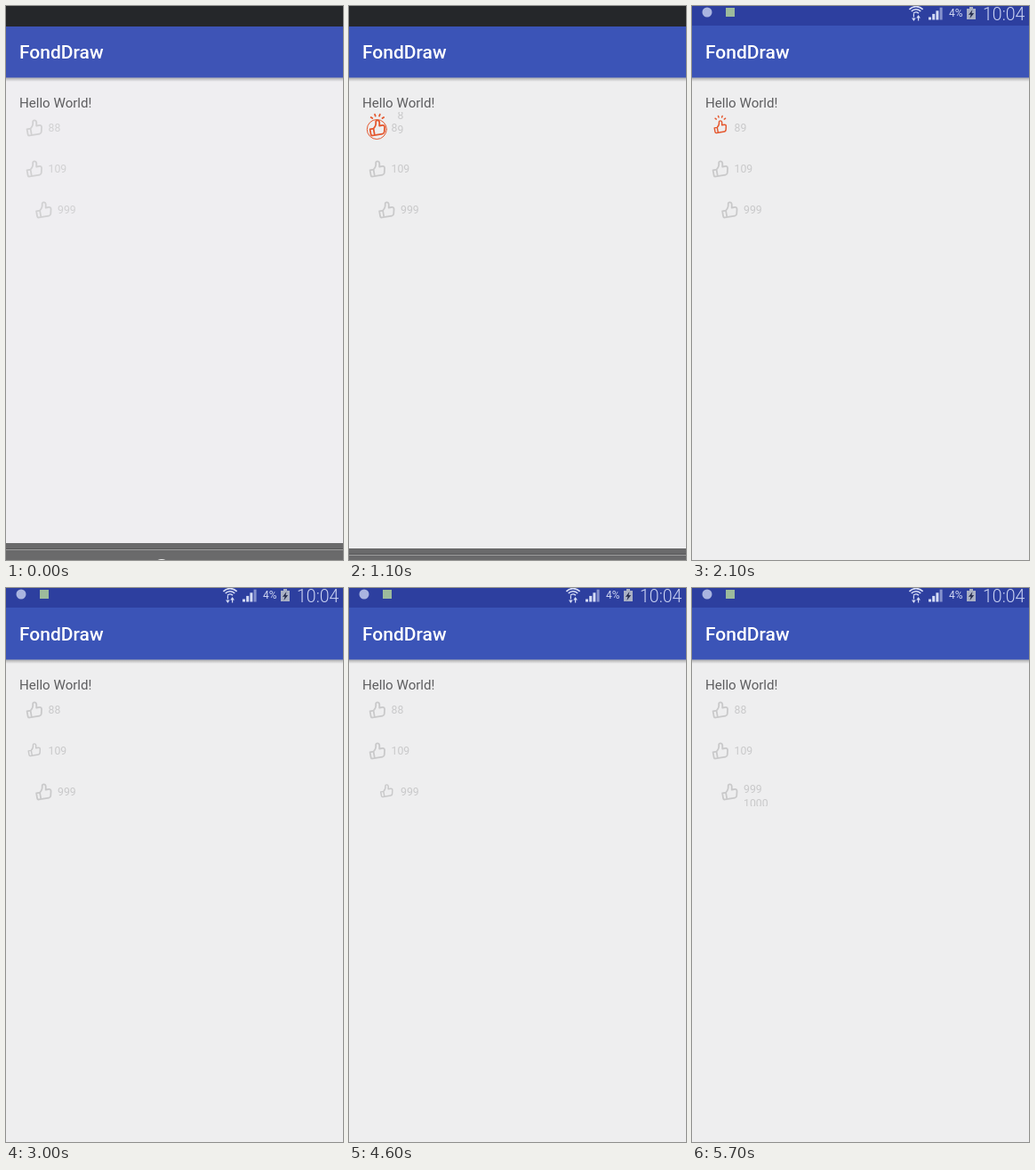
Write an HTML page with a canvas that moves like this. It is 379 by 622 pixels and loops after 5.8 s.

```html
<!DOCTYPE html>
<html lang="en">
<head>
<meta charset="utf-8">
<title>Like counters</title>
<style>
  html, body { margin: 0; width: 100%; height: 100%; overflow: hidden; background: #eeeeef; }
  canvas { display: block; }
</style>
</head>
<body>
<canvas id="stage" width="379" height="622"></canvas>
<script>
const ctx = document.getElementById('stage').getContext('2d');
const W = 379, H = 622, LOOP = 5800, STEP = 100;
const ORANGE = '#e4572e', GREY = '#c9c9ca', FONT = 'Roboto, sans-serif';

const rows = [
  { x: 31.5, y: 137, count: 88 },
  { x: 31.5, y: 183, count: 109 },
  { x: 42, y: 229, count: 999 }
];

// A tap: the icon stays pressed for `hold` ms, then animates in steps.
const taps = [
  { row: 0, on: true, at: 800, hold: 200 },
  { row: 0, on: false, at: 2100, hold: 100 },
  { row: 1, on: true, at: 3000, hold: 100 },
  { row: 1, on: false, at: 3800, hold: 100 },
  { row: 2, on: true, at: 4600, hold: 100 },
  { row: 2, on: false, at: 5500, hold: 100 }
];

// Per phase: pressed, growing, settling, at rest.
const SCALE = [0.8, 0.92, 1, 1];
const ROLL = [0, 0.45, 0.87, 1];
const RING = [0, 8.8, 11, 0];

const thumb = new Path2D(
  'M-8 0L-4 0C-1.2-2-.2-4.6-.1-7C0-9.2 3.9-9 3.8-5.8L3.1-2L6.7-2' +
  'Q8.9-1.8 8.6.5L7.4 5.6Q6.9 7.5 5 7.5L-6.3 7.5Q-8 7.5-8 5.8ZM-4 .2L-4 7.3');

function rect(x, y, w, h, color) {
  ctx.fillStyle = color;
  ctx.fillRect(x, y, w, h);
}

function disc(x, y, r, color) {
  ctx.fillStyle = color;
  ctx.beginPath();
  ctx.arc(x, y, r, 0, Math.PI * 2);
  ctx.fill();
}

function text(str, x, y, size, color, weight = 400) {
  ctx.font = `${weight} ${size}px ${FONT}`;
  ctx.fillStyle = color;
  ctx.fillText(str, x, y);
}

function drawWifi(x, y) {
  ctx.strokeStyle = '#d5dcf5';
  ctx.lineWidth = 1.6;
  for (const r of [4, 7.2, 10.4]) {
    ctx.beginPath();
    ctx.arc(x, y, r, -Math.PI * 0.76, -Math.PI * 0.24);
    ctx.stroke();
  }
  ctx.fillStyle = '#d5dcf5';
  for (const d of [-1, 1]) {
    const cx = x + d * 2.6, cy = y + 2.5;
    ctx.beginPath();
    ctx.moveTo(cx - 2.3, cy);
    ctx.lineTo(cx + 2.3, cy);
    ctx.lineTo(cx, cy - d * 3.5);
    ctx.fill();
    ctx.fillRect(cx - 0.6, cy - 1, 1.2, d * 4);
  }
}

function drawBattery(x, y) {
  rect(x + 3, y, 4, 2, '#a9b0c4');
  rect(x, y + 2, 10, 12, '#a9b0c4');
  ctx.fillStyle = '#1f2648';
  ctx.beginPath();
  ctx.moveTo(x + 6.5, y + 3);
  ctx.lineTo(x + 2, y + 9);
  ctx.lineTo(x + 4.7, y + 8.6);
  ctx.lineTo(x + 3.4, y + 13);
  ctx.lineTo(x + 8.2, y + 7);
  ctx.lineTo(x + 5.4, y + 7.3);
  ctx.fill();
}

function drawStatus() {
  rect(0, 0, W, 22, '#2d3f9f');
  disc(17, 7, 5.5, '#aab5e0');
  rect(38, 2, 10, 10, '#9dbb9c');
  drawWifi(252, 11);
  for (let i = 0; i < 4; i++) {
    const h = 3 + i * 3.6;
    rect(266 + i * 4.2, 15.5 - h, 3, h, i < 3 ? '#d5dcf5' : '#8793cd');
  }
  text('4%', 289, 12, 12, '#cfd6f2');
  drawBattery(309, 1);
  text('10:04', 327, 16, 19.5, '#ccd4f3', 300);
}

function drawPage(t) {
  const early = t < 1000;
  rect(0, 0, W, H, early ? '#efeef1' : '#eeeeef');
  rect(0, 22, W, 58.5, early ? '#3e54b6' : '#3b54b7');

  const shadow = ctx.createLinearGradient(0, 80, 0, 85);
  shadow.addColorStop(0, 'rgba(0,0,0,.3)');
  shadow.addColorStop(1, 'rgba(0,0,0,0)');
  rect(0, 80.5, W, 4.5, shadow);

  if (t < 1300) rect(0, 0, W, 23, '#25272a');
  if (t >= 1200) {
    ctx.globalAlpha = t < 1300 ? 0.6 : 1;
    drawStatus();
    ctx.globalAlpha = 1;
  }
  text('FondDraw', 15, 59.3, 21, '#fff', 500);
  text('Hello World!', 15, 113.5, 15.1, '#5d5d5f');
}

// The grey system bar slides out at the bottom.
function drawNavBar(t) {
  if (t >= 1300) return;
  const y = t < 1000 ? 603 : t < 1100 ? 605 : t < 1200 ? 609 : 617;
  rect(0, y, W, H - y, '#6a6a6b');
  rect(0, y + 6, W, 1, '#565657');
  rect(0, y + 7, W, 1, '#a0a0a0');
  disc(175, y + 28, 10, '#f0f0f0');
}

function drawIcon(row, liked, phase) {
  ctx.save();
  ctx.translate(row.x, row.y);
  ctx.lineCap = ctx.lineJoin = 'round';
  ctx.strokeStyle = liked ? ORANGE : GREY;

  if (liked && RING[phase]) {
    ctx.lineWidth = 1;
    ctx.beginPath();
    ctx.arc(-0.2, 1.5, RING[phase], 0, Math.PI * 2);
    ctx.stroke();
  }

  const s = SCALE[phase];
  ctx.translate(0, -6);
  ctx.scale(s, s);
  ctx.translate(0, 6);
  ctx.lineWidth = 1.8;
  if (liked) {
    for (const deg of [-55, -19, 19, 55]) {
      const a = deg * Math.PI / 180, sx = Math.sin(a), sy = -Math.cos(a);
      ctx.beginPath();
      ctx.moveTo(0.4 + sx * 6.8, -7 + sy * 6.8);
      ctx.lineTo(0.4 + sx * 8.8, -7 + sy * 8.8);
      ctx.stroke();
    }
  }
  ctx.rotate(-Math.PI / 18);
  ctx.stroke(thumb);
  ctx.restore();
}

// Only the digits that differ roll; a like rolls upwards.
function drawCount(row, on, phase) {
  const x = row.x + 16, y = row.y + 3.5, size = 12.25, travel = 16;
  const low = String(row.count), high = String(row.count + 1);
  let same = 0;
  while (low.length === high.length && low[same] === high[same]) same++;
  const p = on ? ROLL[phase] : 1 - ROLL[phase];

  ctx.save();
  ctx.beginPath();
  ctx.rect(x - 1, row.y - 18, 60, 34);
  ctx.clip();
  const fixed = low.slice(0, same);
  text(fixed, x, y, size, GREY);
  const dx = x + ctx.measureText(fixed).width;
  if (p < 1) text(low.slice(same), dx, y - travel * p, size, GREY);
  if (p > 0) text(high.slice(same), dx, y + travel * (1 - p), size, GREY);
  ctx.restore();
}

function phaseOf(tap, t) {
  const since = t - tap.at - tap.hold;
  return since < 0 ? 0 : Math.min(3, 1 + Math.floor(since / STEP));
}

function drawRow(row, i, t) {
  const tap = taps.filter(e => e.row === i && e.at <= t).pop();
  const on = tap ? tap.on : false;
  const phase = tap ? phaseOf(tap, t) : 3;
  const liked = phase === 0 ? !on : on;
  ctx.globalAlpha = t < 1000 ? 0.8 : 1;
  drawIcon(row, liked, phase);
  drawCount(row, on, phase);
  ctx.globalAlpha = 1;
}

const start = performance.now();

function draw() {
  const now = Math.max(0, performance.now() - start) % LOOP;
  const t = Math.floor(now / STEP) * STEP;
  drawPage(t);
  rows.forEach((row, i) => drawRow(row, i, t));
  drawNavBar(t);
  requestAnimationFrame(draw);
}
draw();
</script>
</body>
</html>
```
